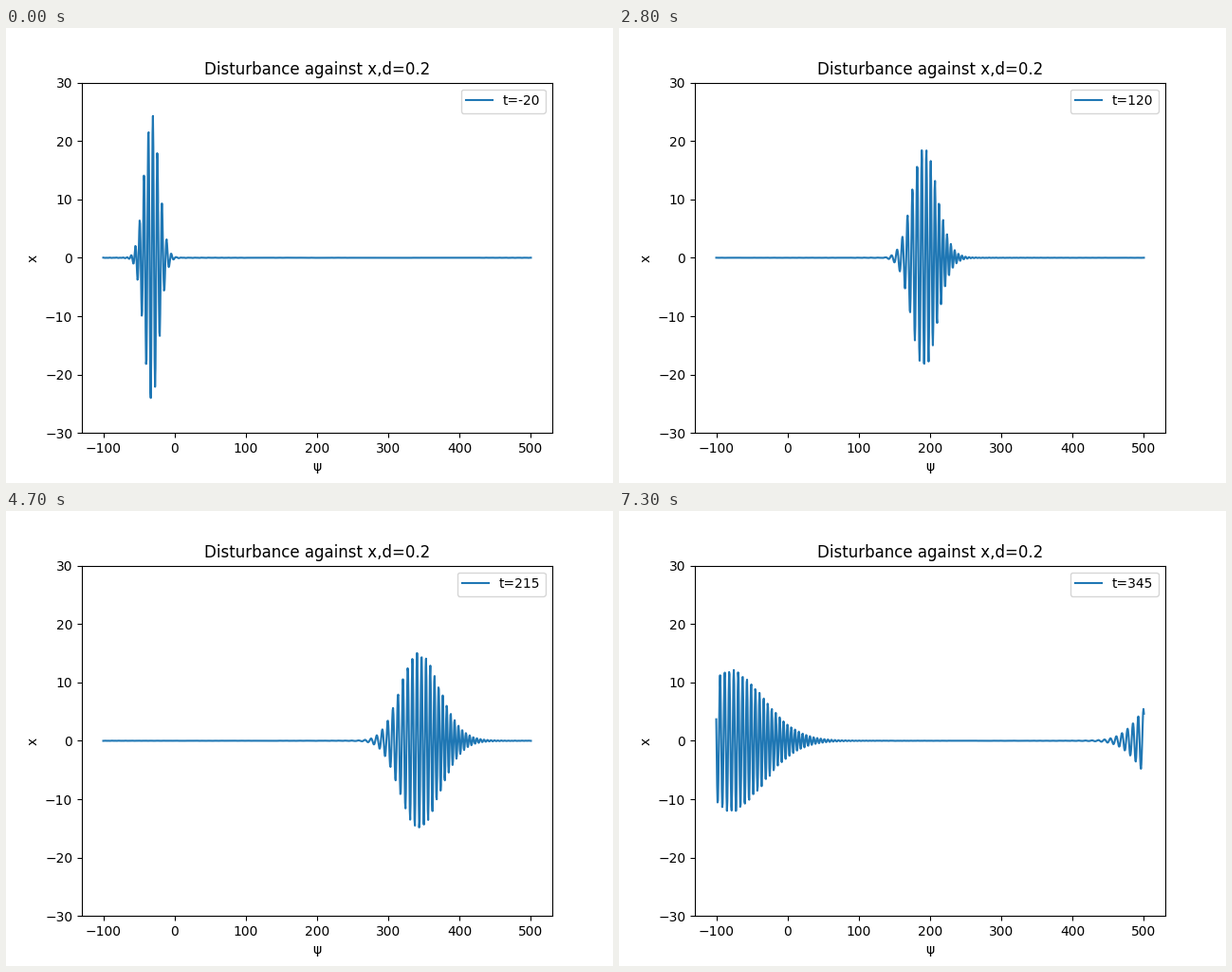
Recreate the animation shown at these times as a matplotlib script. Size 640 by 480 pixels, loop 7400 ms.

```python
import numpy as np
import matplotlib.pyplot as plt
from matplotlib.animation import FuncAnimation

FRAMES = 74
INTERVAL = 100
T_START, T_STEP = -20, 5

D = 0.2        # dispersion strength
K0 = 1.0       # central wavenumber
SIGMA = 0.1    # spectral width

x = np.linspace(-100, 500, 1000)
k = K0 + 0.01 * np.arange(-30, 31)
omega = k + D * k**3
weight = np.exp(-(k - K0)**2 / (2 * SIGMA**2))
modes = np.exp(1j * np.outer(x, k))


def packet(t):
    """Sum of dispersive plane waves at time t."""
    return (modes @ (weight * np.exp(-1j * omega * t))).real


def label(t):
    return f"t={t}"


fig, ax = plt.subplots(figsize=(6.4, 4.8), dpi=100)
line, = ax.plot(x, packet(T_START), label=label(T_START))
ax.set_ylim(-30, 30)
ax.set_title("Disturbance against x,d=0.2")
ax.set_xlabel("ψ")
ax.set_ylabel("x")
legend_text = ax.legend(loc="upper right").get_texts()[0]


def update(i):
    t = T_START + T_STEP * i
    line.set_ydata(packet(t))
    legend_text.set_text(label(t))
    return line, legend_text


def init():
    return update(0)


anim = FuncAnimation(fig, update, frames=FRAMES, init_func=init,
                     interval=INTERVAL, repeat=True, repeat_delay=0)
plt.show()
```
